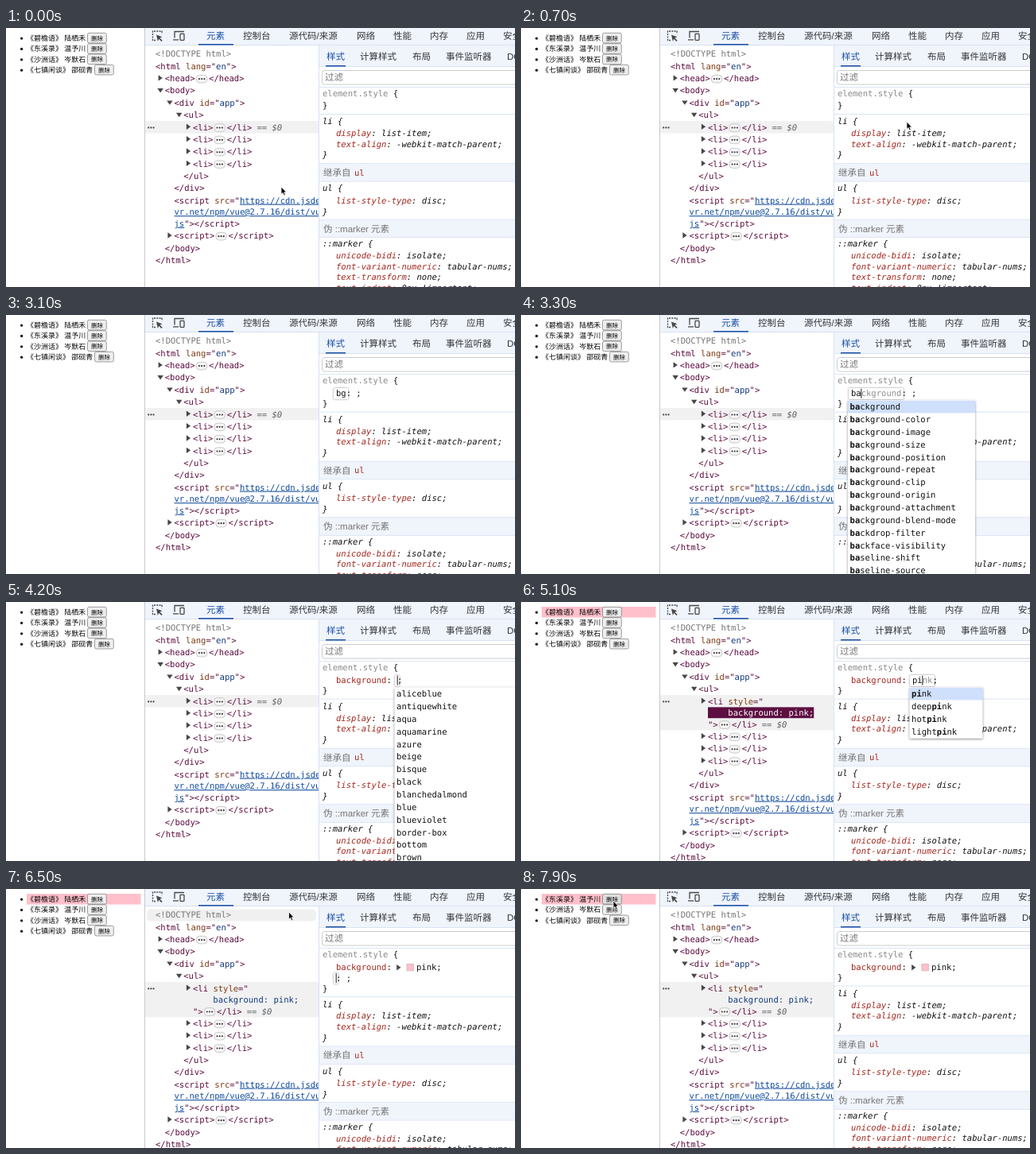
An HTML page for the animation above (8 s loop, 640x326 px).

```html
<!DOCTYPE html>
<html lang="zh">
<head>
<meta charset="utf-8">
<title>List and inspector</title>
<style>
html, body { margin: 0; width: 100%; height: 100%; overflow: hidden; background: #fff; }
svg { display: block; width: 640px; height: 326px; }
text { white-space: pre; text-rendering: geometricPrecision; }
.mono { font: 10.54px "DejaVu Sans Mono", monospace; }
.ui { font: 11.5px "Liberation Sans", "Noto Sans CJK SC", "Noto Sans CJK", sans-serif; }
.page { font: 9px "Liberation Serif", "Noto Sans CJK SC", "Noto Sans CJK", sans-serif; }
.btn { font-size: 7.5px; }
</style>
</head>
<body>
<svg id="stage" viewBox="0 0 640 326" xmlns="http://www.w3.org/2000/svg"></svg>
<script>
const LOOP = 8000, CW = 6.345;
const C = {
  tag: '#5c0a3c', attr: '#7c3a12', value: '#12397c', link: '#0f4a9c', prop: '#a3281f', ink: '#111',
  grey: '#757575', blue: '#174ea6', bar: '#f0f4fb', line: '#d3dff2', pink: '#ffc0cb'
};
const BOOKS = [['碧檐语', '陆栖禾'], ['东溪录', '温予川'], ['沙洲话', '岑默石'], ['七镇闲谈', '邵砚青']];
const PROPS = ['background', 'background-color', 'background-image', 'background-size',
  'background-position', 'background-repeat', 'background-clip', 'background-origin',
  'background-attachment', 'background-blend-mode', 'backdrop-filter', 'backface-visibility',
  'baseline-shift', 'baseline-source'];
const VALUES = {
  '': ['aliceblue', 'antiquewhite', 'aqua', 'aquamarine', 'azure', 'beige', 'bisque', 'black',
    'blanchedalmond', 'blue', 'blueviolet', 'border-box', 'bottom', 'brown'],
  p: ['padding-box', 'palegoldenrod', 'palegreen', 'paleturquoise', 'palevioletred', 'papayawhip',
    'peachpuff', 'peru', 'pink', 'plum', 'powderblue', 'purple', 'aqua', 'deeppink'],
  pi: ['pink', 'deeppink', 'hotpink', 'lightpink']
};

// start time, edited field, typed text, completed text
const KEYS = [
  [0, '', '', ''], [1100, 'name', '', ''], [2100, 'name', 'b', 'background'],
  [2400, 'name', 'bg', 'bg'], [3200, 'name', 'b', 'background'], [3300, 'name', 'ba', 'background'],
  [4200, 'value', '', ''], [4600, 'value', 'p', 'padding-box'], [5050, 'value', 'pi', 'pink'],
  [5250, 'value', 'pin', 'pink'], [5500, 'value', 'pink', 'pink'], [6050, 'next', '', ''], [7600, 'done', '', '']
];
// time, x, y of the pointer tip
const PATH = [
  [0, 346, 200], [100, 346, 200], [900, 531, 91], [1200, 517, 92], [1550, 517, 92], [1700, 477, 91],
  [6350, 477, 91], [6500, 356, 29], [6720, 240, 4], [6980, 90, 9], [7200, 116, 16], [7300, 116, 15], [8000, 116, 15]
];

const esc = s => s.replace(/&/g, '&amp;').replace(/</g, '&lt;');
const rect = (x, y, w, h, fill, more = '') =>
  `<rect x="${x}" y="${y}" width="${w}" height="${h}" fill="${fill}" ${more}/>`;
const path = (d, fill, more = '') => `<path d="${d}" fill="${fill}" ${more}/>`;
const label = (x, y, s, fill, cls = 'ui') =>
  `<text class="${cls}" x="${x}" y="${y}" fill="${fill}">${esc(s)}</text>`;
// A line of code centred on y, from [text, colour, attributes] parts
const code = (x, y, parts, more = '') => `<text class="mono" x="${x}" y="${y + 3.4}" ${more}>` +
  parts.map(([s, fill = C.ink, a = '']) => `<tspan fill="${fill}" ${a}>${esc(s)}</tspan>`).join('') + '</text>';
const ITALIC = 'style="font-style:italic"';
const arrow = (x, y, open) => open
  ? path(`M${x - .5} ${y - 2.5}h7.4l-3.7 5.4z`, '#474747')
  : path(`M${x + .7} ${y - 4}v7.4l5.2-3.7z`, '#474747');
const pill = (x, y) => rect(x, y - 4.4, 13.4, 9.6, '#f6f6f6', 'rx="4" stroke="#b5b5b5" stroke-width=".7"') +
  [3.5, 6.7, 9.9].map(d => `<circle cx="${x + d}" cy="${y + .4}" r="1.05" fill="#333"/>`).join('');

function pointer(t) {
  const i = Math.max(1, PATH.findIndex(p => p[0] > t));
  const [t0, x0, y0] = PATH[i - 1], [t1, x1, y1] = PATH[i];
  const k = (t - t0) / (t1 - t0);
  return { x: x0 + (x1 - x0) * k, y: y0 + (y1 - y0) * k, shown: t < 2100 || t >= 6250 };
}

function page(t, styled) {
  const rows = t < 7800 ? BOOKS : BOOKS.slice(1);
  let s = rect(0, 0, 174, 326, '#fff');
  if (styled === 'pink') s += rect(26, 6, 143.5, 13.5, C.pink);
  rows.forEach(([title, author], i) => {
    const y = 12.7 + 13.35 * i, x = 30.5 + 9 * (title.length + 5);
    const fill = i || t < 7150 ? '#efefef' : t >= 7600 && t < 7800 ? '#d2d2d2' : '#dfdfdf';
    s += `<circle cx="19.6" cy="${y + .4}" r="1.6"/>` +
      label(26, y + 3.3, `《${title}》 ${author}`, '#000', 'page') +
      rect(x, y - 6.4, 23.8, 12.6, fill, 'rx="2" stroke="#767676" stroke-width=".7"') +
      label(x + 4.4, y + 2.9, '删除', '#000', 'page btn');
  });
  return s;
}

function flash(age) {
  if (age < 0 || age >= 1400) return { alpha: 0, fill: C.tag };
  const k = Math.min(1, age / 1120), mix = (a, b) => Math.round(a + (b - a) * k);
  return {
    fill: `rgb(${mix(92, 117)},${mix(10, 117)},${mix(62, 117)})`,
    alpha: age < 1120 ? 1 : 1 - (age - 1120) / 280
  };
}

function tree(t, styled, mouse) {
  const rows = [];
  let y = 33, s = rect(175, 22, 218, 304, '#fff'), body = '';
  const line = (depth, parts, mark, step = 15.35) => {
    const x = 188 + depth * 11.75;
    rows.push(y);
    if (mark) body += arrow(x - 8.8, y - .5, mark === 'open');
    body += code(x, y, parts);
    y += step;
  };
  // Collapsed tail: ellipsis pill, closing tag and the selection hint
  const tail = (x, yy, name, selected) => {
    body += pill(x + 1.6, yy) + code(x + 17.3, yy, [[`</${name}>`, C.tag]]);
    if (selected) body += code(x + 17.3 + (name.length + 3) * CW + 6, yy, [['== $0', '#5f6368', ITALIC]]);
  };
  const folded = (depth, name, selected) => {
    tail(188 + depth * 11.75 + (name.length + 2) * CW, y, name, selected);
    line(depth, [[`<${name}>`, C.tag]], 'shut');
  };
  const attr = (name, key, value) =>
    [['<' + name + ' ', C.tag], [key, C.attr], ['="', C.tag], [value, C.value], ['">', C.tag]];

  line(0, [['<!DOCTYPE html>', C.grey]]);
  line(0, attr('html', 'lang', 'en'));
  folded(1, 'head');
  line(1, [['<body>', C.tag]], 'open');
  line(2, attr('div', 'id', 'app'), 'open');
  line(3, [['<ul>', C.tag]], 'open');

  s += rect(175, y - 8, 218, styled ? 44.3 : 15.4, '#f1f1f1');
  body += [179.2, 182.4, 185.6].map(x => `<circle cx="${x}" cy="${y + .3}" r="1.1" fill="#474747"/>`).join('');
  if (styled) {
    line(4, [['<li ', C.tag], ['style', C.attr], ['="', C.tag]], 'shut', 14.5);
    const f = flash(t - (t < 5050 ? 4600 : 5050));
    const css = `    background: ${styled};`;
    if (f.alpha) body += rect(235, y - 7.2, css.length * CW, 13.8, f.fill, `opacity="${f.alpha}"`);
    line(4, [[css, f.alpha > .5 ? '#fff' : C.value]], '', 14.5);
    tail(235 + 2 * CW, y, 'li', true);
    line(4, [['">', C.tag]]);
  } else folded(4, 'li', true);
  for (let i = 0; i < 3; i++) folded(4, 'li');
  line(3, [['</ul>', C.tag]]);
  line(2, [['</div>', C.tag]]);
  const link = 'text-decoration="underline"';
  line(2, [['<script ', C.tag], ['src', C.attr], ['="', C.tag], ['https://cdn.jsdeli', C.link, link]], '', 14.6);
  line(2, [['vr.net/npm/vue@2.7.16/dist/vue.', C.link, link]], '', 14.6);
  line(2, [['js', C.link, link], ['"><\/script>', C.tag]]);
  folded(2, 'script');
  line(1, [['</body>', C.tag]]);
  line(0, [['</html>', C.tag]]);

  const over = mouse.shown && t > 100 && mouse.x > 176 && mouse.x < 391 && mouse.y > 25;
  const row = over && rows.find(r => Math.abs(r - mouse.y) < 7.7);
  if (row) s += rect(177, row - 7.5, 213, 15, '#f0f0f0', 'rx="5"');
  return s + body;
}

function popup(x, list, query, width) {
  let s = rect(x, 107.3, width, list.length * 15.85 + 1, '#fff',
    'style="filter:drop-shadow(0 1px 1.5px rgba(0,0,0,.45))"');
  list.forEach((item, i) => {
    const y = 115.8 + i * 15.85, at = item.indexOf(query);
    if (query && !i) s += rect(x, y - 8, width, 15.6, '#cfe0fc');
    s += code(x + 2.6, y, at < 0 ? [[item]] : [
      [item.slice(0, at)], [query, C.ink, 'font-weight="bold"'], [item.slice(at + query.length)]]);
  });
  return s;
}

function styles(t, key) {
  const [since, field, typed, full] = key;
  let s = rect(393, 22, 247, 304, '#fff');
  const lines = { name: 1, value: 1, next: 2, done: 1 }[field] || 0;
  const dy = lines * 13.7;
  const prop = (y, name, value) => code(415, y + dy, [[name, C.prop], [`: ${value};`]], ITALIC);
  const rule = (y, head) => code(398, y + dy, [[head]], ITALIC);
  const section = y => rect(393, y - 11.5 + dy, 247, 22.5, C.bar) +
    rect(393, y - 11.8 + dy, 247, .7, C.line) + rect(393, y + 10.8 + dy, 247, .7, C.line);

  s += code(398, 83, [['element.style', '#8a8a8a'], [' {']]) + code(398, 98 + dy, [['}']]);
  s += rect(393, 108 + dy, 247, .8, C.line);
  s += rule(117.8, 'li {') + prop(132.4, 'display', 'list-item') +
    prop(146.2, 'text-align', '-webkit-match-parent') + rule(160, '}');
  s += section(182) + label(399, 186 + dy, '继承自', C.grey) + code(438, 182.2 + dy, [['ul', C.prop]]);
  s += rule(202, 'ul {') + prop(217.3, 'list-style-type', 'disc') + rule(231.3, '}');
  s += section(252.5) + label(399, 256.5 + dy, '伪 ::marker 元素', C.grey);
  s += rule(272, '::marker {') + prop(286.7, 'unicode-bidi', 'isolate') +
    prop(300.3, 'font-variant-numeric', 'tabular-nums') + prop(314, 'text-transform', 'none') +
    prop(327.6, 'text-indent', '0px !important');

  // Inline editor: white box, typed part, grey completion, caret
  const editor = (x, y, after) => {
    const caret = x + typed.length * CW;
    return rect(x - 3, y - 6.8, full.length * CW + 5.5, 14, '#fff',
      'rx="1.5" style="filter:drop-shadow(0 .6px 1.2px rgba(0,0,0,.5))"') +
      code(x, y, [[typed], [full.slice(typed.length), '#8f8f8f'], [after]]) +
      ((t - since) % 1000 < 500 ? rect(caret - .3, y - 6, .9, 12, '#000') : '');
  };
  const name = [['background', C.prop], [': ']];
  if (field === 'name') {
    s += editor(415, 98.7, ': ;');
    if (typed && typed !== 'bg') s += popup(411, PROPS, typed, 160);
  } else if (field === 'value') {
    const list = VALUES[typed] || VALUES.pi;
    s += code(415, 98.7, name) + editor(492, 98.7, ';') +
      popup(488.5, list, typed, list.length > 4 ? 160 : 92);
  } else if (lines) {
    s += code(415, 98.7, name) + arrow(490.5, 99, false) +
      rect(503.9, 94.3, 8.6, 8.6, C.pink, 'stroke="#c9b3b7" stroke-width=".7"') + code(516, 98.7, [['pink;']]);
    if (field === 'next') s += editor(415, 112.2, ': ;');
  }
  return s;
}

function chrome() {
  let s = rect(175, 0, 465, 21.5, C.bar) + rect(175, 21.2, 465, .9, C.line) +
    rect(393, 22, 247, 26, C.bar) + rect(393, 48, 247, .9, C.line) +
    rect(393, 49, 247, 25, '#fff') + rect(393, 74, 247, .8, C.line) +
    rect(393, 22, .9, 304, C.line) + rect(174, 0, 1, 326, '#c6c9cf');
  const tabs = (y, list) => list.map(([x, name], i) =>
    label(x, y, name, i ? '#333639' : C.blue)).join('');
  s += tabs(14.2, [[252, '元素'], [298, '控制台'], [356, '源代码/来源'], [441, '网络'],
    [487, '性能'], [533, '内存'], [579, '应用'], [625, '安全']]);
  s += tabs(40.2, [[403, '样式'], [445, '计算样式'], [511, '布局'], [553, '事件监听器'], [630, 'DOM 断点']]);
  s += rect(242, 20, 44, 1.5, C.blue) + rect(402, 47, 25, 1.5, C.blue);
  s += rect(397.5, 53.5, 260, 17.6, '#fff', 'rx="3" stroke="#c4c7cc" stroke-width=".9"') +
    label(401, 66.3, '过滤', C.grey);
  const ink = 'stroke="#474747" stroke-width="1.3"';
  s += path('M188 15.5H184.5V4H196V7.5', 'none', ink + ' stroke-dasharray="2 1.3"') +
    path('M189 8.5l7.5 2.7-3.1 1.4 3.2 3.2-1.1 1.1-3.2-3.2-1.4 3z', '#474747');
  s += path('M212 12.5V4.5H224M210 14.8H217', 'none', ink) +
    rect(219, 7.3, 5, 8, 'none', 'rx=".8" ' + ink);
  return s;
}

const stage = document.getElementById('stage'), frame = chrome();
let shown = '';

function draw(t) {
  const key = KEYS.filter(k => k[0] <= t).pop();
  const styled = t < 4600 ? '' : t < 5050 ? 'padding-box' : 'pink';
  const mouse = pointer(t);
  let s = page(t, styled) + tree(t, styled, mouse) + styles(t, key) + frame;
  if (mouse.shown) s += path('M0 0V9.3L2.1 7.4 3.6 10.8 5.3 10.1 3.8 6.8H6.6Z', '#000',
    `stroke="#fff" stroke-width=".8" transform="translate(${mouse.x.toFixed(1)} ${mouse.y.toFixed(1)})"`);
  if (s !== shown) stage.innerHTML = shown = s;
}

const start = performance.now();
function tick() {
  draw((performance.now() - start) % LOOP);
  requestAnimationFrame(tick);
}
tick();
</script>
</body>
</html>
```
